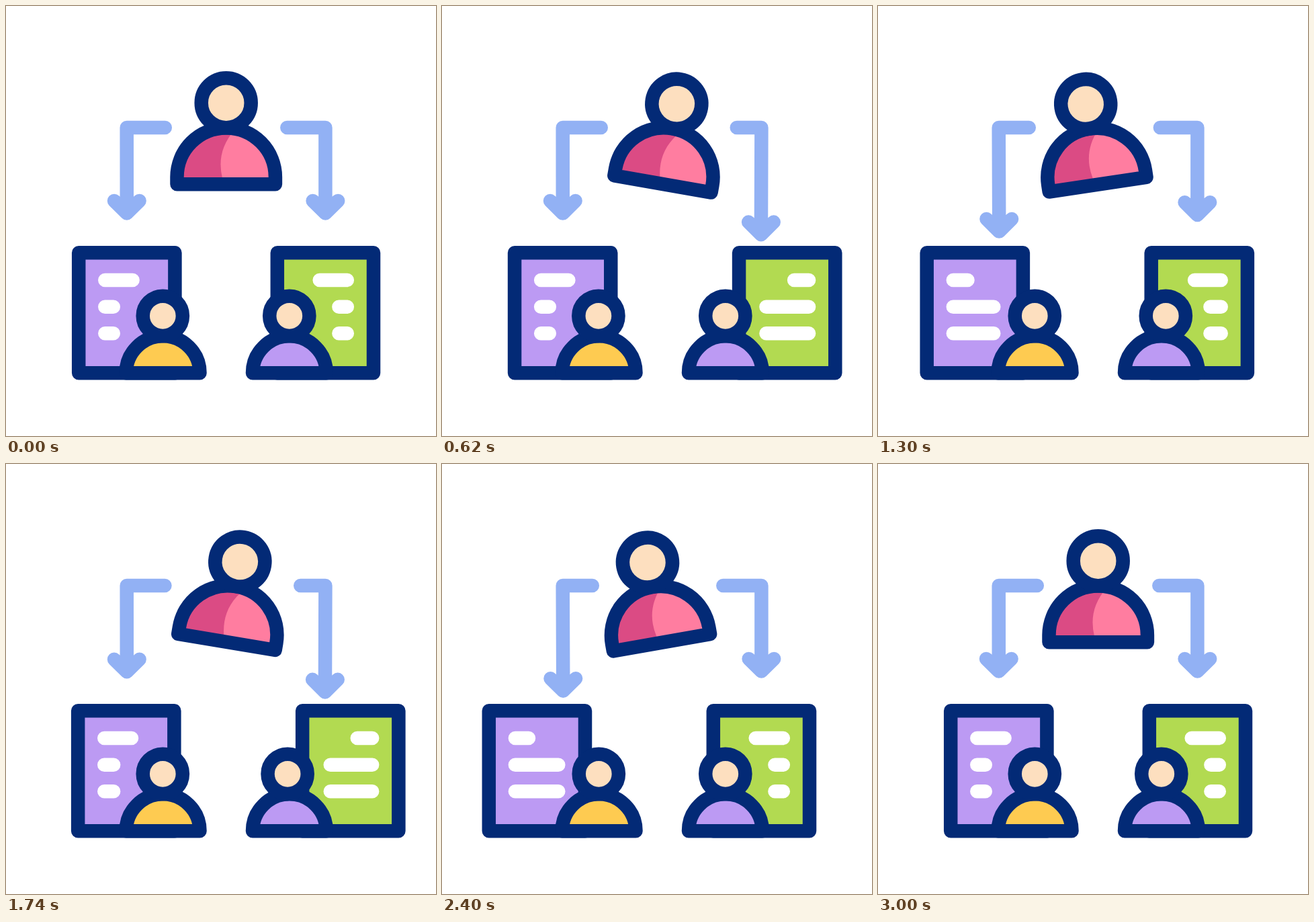
Write an HTML page that moves like this. It is 640 px wide and 640 px high and loops after 3.02 s.

```html
<!DOCTYPE html>
<html lang="en">
<head>
<meta charset="utf-8">
<title>Team delegation</title>
<style>
  html, body { margin: 0; width: 100%; height: 100%; overflow: hidden; background: #fff; }
  svg { display: block; width: 100%; height: 100%; stroke-width: 20.5; stroke-linecap: round; stroke-linejoin: round; }
  .ink { stroke: #032a76; }
  .arrow { fill: none; stroke: #92b1f4; }
  .text { fill: none; stroke: #fff; }
  .face { fill: #fddfbf; }
</style>
</head>
<body>
<svg viewBox="0 0 640 640">
  <path id="arrowL" class="arrow"/>
  <path id="arrowR" class="arrow"/>

  <g id="boss" class="ink">
    <path fill="#ff7da0" stroke="none" d="M254.5 265.3V254.6a73.2 73.2 0 0 1 146.4 0V265.3Z"/>
    <path fill="#db4b84" stroke="none" d="M254.5 265.3V254.6a73.2 73.2 0 0 1 73.2-73.2L341 184C326 200 319.5 218 319.5 236Q319.5 246 322 256V265.3Z"/>
    <path fill="none" d="M254.5 265.3V254.6a73.2 73.2 0 0 1 146.4 0V265.3Z"/>
    <circle class="face" cx="327.7" cy="144.2" r="37"/>
  </g>

  <g class="ink">
    <rect id="panelL" x="108.2" y="367.2" width="143.2" height="179.1" fill="#bc9af3"/>
    <path id="textL" class="text"/>
    <path fill="#fecb51" d="M178.7 546.2a54.9 54.9 0 0 1 109.8 0Z"/>
    <circle id="headL" class="face" cx="233.3" cy="461.3" r="29.6"/>
  </g>

  <g class="ink">
    <rect id="panelR" x="403.8" y="367.2" width="143.2" height="179.1" fill="#b2da51"/>
    <path id="textR" class="text"/>
    <path fill="#bc9af3" d="M367 546.2a54.9 54.9 0 0 1 109.8 0Z"/>
    <circle id="headR" class="face" cx="421.8" cy="461.3" r="29.6"/>
  </g>
</svg>
<script>
const LOOP = 3020, BEAT = 600, END = 3000;
const el = id => document.getElementById(id);
const set = (id, name, value) => el(id).setAttribute(name, value);

// Evenly spaced keys, each step eased in and out.
function tween(keys, pos) {
  const i = Math.min(Math.floor(pos), keys.length - 2);
  const u = Math.min(pos - i, 1);
  return keys[i] + (keys[i + 1] - keys[i]) * u * u * (3 - 2 * u);
}

function arrow(id, start, corner, tip, y) {
  set(id, 'd', `M${start} 181H${corner}L${tip} ${y}M${tip - 18.8} ${y - 18.6}L${tip} ${y}L${tip + 18.8} ${y - 18.6}`);
}

function textLines(id, edge, first, rest) {
  set(id, 'd', `M${edge} 408.1H${first}M${edge} 447.7H${rest}M${edge} 487.2H${rest}`);
}

function draw(time) {
  const pos = Math.min(time, END) / BEAT;
  const left = tween([0, 0, 1, 0, 1, 0], pos);
  const right = tween([0, 1, 0, 1, 0, 0], pos);
  const shake = tween([0, 12.8, -12.8, 0], pos % 1 * 3);
  const beat = Math.floor(pos);

  set('boss', 'transform', `rotate(${10 * (right - left)} 330 269.5)`);
  arrow('arrowL', 236.8 - 13 * left, 179.7, 179.8 + 0.5 * left, 308.5 + 29.3 * left);
  arrow('arrowR', 418.3 + 20.5 * right, 475.4, 475.4 - 0.5 * right, 308.5 + 31.8 * right);

  set('panelL', 'transform', `translate(${-38.4 * left})`);
  set('panelR', 'transform', `translate(${38.4 * right})`);
  textLines('textL', 147.3 - 38.4 * left, 188.6 - 59.6 * left, 159.8 + 13.5 * left);
  textLines('textR', 507.8 + 38.4 * right, 466.7 + 57.6 * right, 495.4 - 13 * right);

  // Each head shakes while its own panel is active, in mirrored directions.
  const nodL = beat === 1 || beat === 3, nodR = beat === 0 || beat === 2;
  set('headL', 'transform', `translate(${nodL ? -shake : 0})`);
  set('headR', 'transform', `translate(${nodR ? shake : 0})`);
}

const begin = performance.now();
function tick() {
  draw((performance.now() - begin) % LOOP);
  requestAnimationFrame(tick);
}
tick();
</script>
</body>
</html>
```
